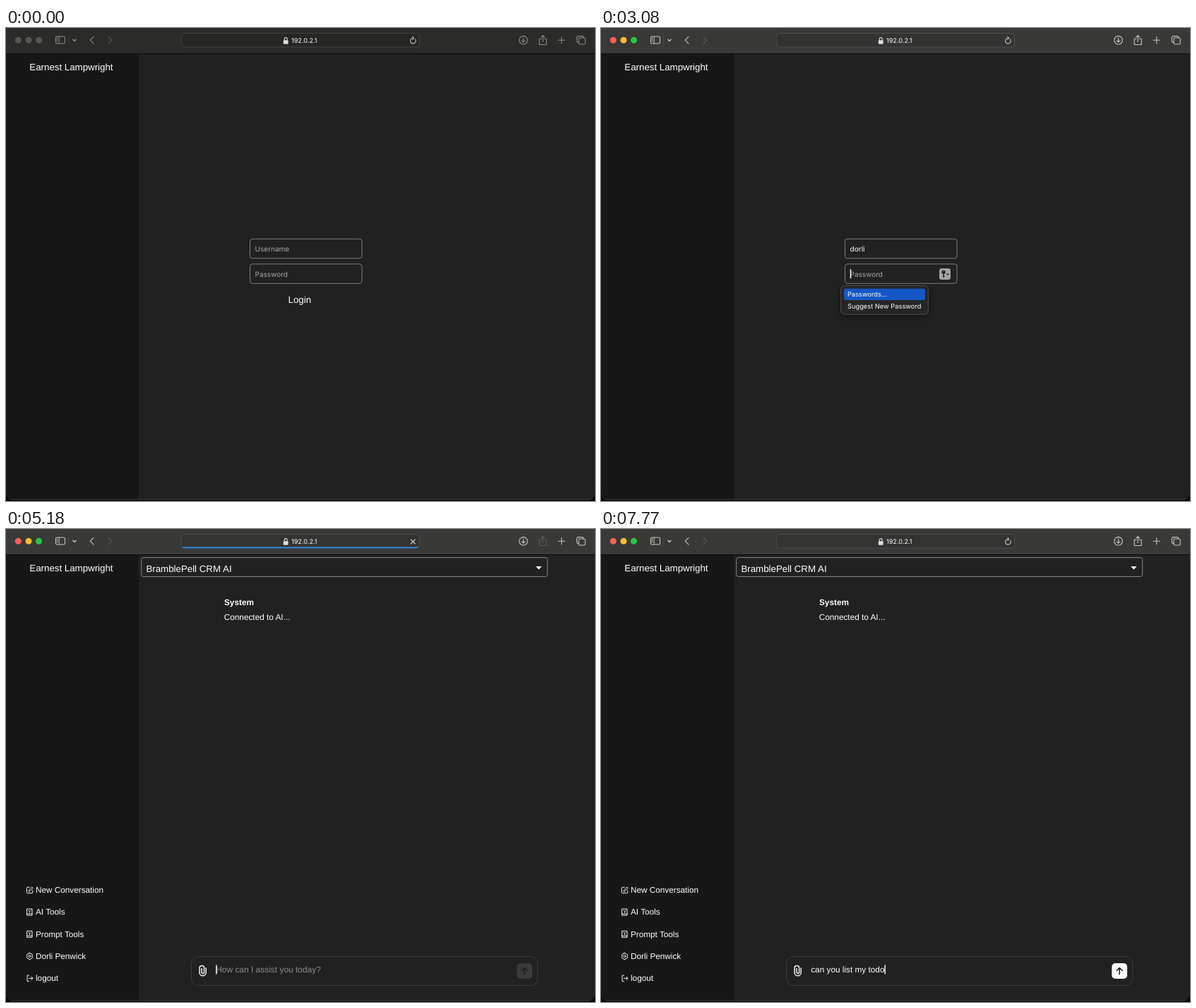
Write an HTML page that moves like this. It is 834 by 671 pixels and loops after 8 s.

```html
<!DOCTYPE html>
<html lang="en">
<head>
<meta charset="utf-8">
<title>Login and chat</title>
<style>
  html, body { margin: 0; width: 100%; height: 100%; overflow: hidden; background: #060606; }
  svg { display: block; width: 834px; height: 671px; --ink: #8b8b8a; --dim: #505050; }
  svg.active { --ink: #c6c6c5; --dim: #5c5c5b; }
  text { font-family: "Liberation Sans", Arial, sans-serif; font-size: 11.8px; fill: #fff;
         white-space: pre; text-rendering: geometricPrecision; }
  .ui { font-family: Inter, sans-serif; font-size: 10px; }
  .small { font-family: Inter, sans-serif; font-size: 9.3px; }
  .big { font-size: 13.3px; }
  .hint { fill: #a9a9a9; }
  .line { fill: none; stroke: var(--ink); stroke-width: 1.1; stroke-linecap: round; stroke-linejoin: round; }
  .item { fill: none; stroke: #f2f2f2; stroke-width: 1; stroke-linecap: round; stroke-linejoin: round; }
  .bar { fill: #2b2b2a; }
  .active .bar { fill: #393938; }
  .address { fill: #262625; stroke: #444443; }
  .active .address { fill: #333332; stroke: #4e4e4d; }
  .light { fill: #575756; }
  .active .red { fill: #ff5f57; }
  .active .amber { fill: #febc2e; }
  .active .green { fill: #28c840; }
  .field { fill: none; stroke: #7d7d7d; }
</style>
</head>
<body>
<svg id="stage" viewBox="0 0 834 671">
  <defs>
    <clipPath id="window"><rect y="-10" width="834" height="679.5" rx="9"/></clipPath>
    <clipPath id="addressClip"><rect x="248" y="7" width="337.5" height="20.5" rx="5"/></clipPath>
    <filter id="shadow" x="-20%" y="-30%" width="140%" height="180%">
      <feDropShadow dx="0" dy="3" stdDeviation="4" flood-color="#000" flood-opacity=".4"/>
    </filter>
  </defs>

  <g clip-path="url(#window)">
    <rect width="834" height="671" fill="#212121"/>
    <rect y="37" width="188" height="634" fill="#171717"/>
    <rect class="bar" width="834" height="36"/>
    <rect y="36" width="834" height="1" fill="#080808"/>
    <path d="M0 669H834" stroke="#484848"/>
  </g>

  <g id="toolbar">
    <circle class="light red" cx="17.3" cy="17.3" r="4.5"/>
    <circle class="light amber" cx="32" cy="17.3" r="4.5"/>
    <circle class="light green" cx="46.5" cy="17.3" r="4.5"/>
    <g class="line">
      <rect x="70.5" y="12" width="13" height="10" rx="1.8"/>
      <path d="M75.2 12V22M72.2 14.3h1.3M72.2 16.4h1.3M72.2 18.5h1.3" stroke-width=".9"/>
      <path d="M94.7 16.3l2.2 2.2 2.2-2.2" stroke-width="1.3"/>
      <path d="M124 12.3l-4.8 4.9 4.8 4.9"/>
    </g>
    <path d="M88.5 11V23" stroke="#484847" stroke-width=".8"/>
    <path class="line" d="M145 12.3l4.8 4.9-4.8 4.9" style="stroke:var(--dim)"/>
    <rect class="address" x="248.2" y="7.5" width="337.2" height="19.6" rx="5" stroke-width="1"/>
    <g clip-path="url(#addressClip)"><rect id="progress" x="248" y="25.4" width="0" height="2" fill="#3488e6"/></g>
    <rect x="392.8" y="17.2" width="6.8" height="5.6" rx="1" fill="#dededd"/>
    <path d="M394.2 17.5v-1.9a2 2 0 0 1 4 0v1.9" fill="none" stroke="#dededd" stroke-width="1.1"/>
    <text class="small" x="404" y="21.2" style="font-size:9.1px">192.0.2.1</text>
    <g id="reload" class="line" style="stroke:#c2c2c1">
      <path d="M579.6 16A3.9 3.9 0 1 1 576.3 14.3"/>
      <path d="M575.6 12.3l2.1 2-2.1 2"/>
    </g>
    <path id="stop" class="line" style="stroke:#d2d2d1" d="M573.2 14.8l6.2 6.2M579.4 14.8l-6.2 6.2"/>
    <g class="line">
      <circle cx="732.6" cy="17.2" r="5.8"/>
      <path d="M732.6 14v6M730.2 17.8l2.4 2.4 2.4-2.4"/>
      <path id="share" d="M758 15.3h-2.8v8.2h10v-8.2h-2.8M760.2 19.5V10.8M757.8 13l2.4-2.4 2.4 2.4"/>
      <path d="M782 17.2h9.4M786.7 12.5v9.4"/>
      <rect x="811" y="14" width="9.2" height="9" rx="1.8"/>
      <path d="M811 20.5h-1a1.7 1.7 0 0 1-1.7-1.7v-5.4a1.8 1.8 0 0 1 1.8-1.8h5.9a1.7 1.7 0 0 1 1.7 1.7v.7"/>
    </g>
  </g>

  <text class="big" x="33.3" y="60">Earnest Lampwright</text>

  <g id="login">
    <rect class="field" x="345.5" y="299.2" width="158.5" height="27.6" rx="3.5"/>
    <rect class="field" x="345.5" y="334.8" width="158.5" height="27.6" rx="3.5"/>
    <text id="user" class="ui" x="352.6" y="317"></text>
    <text id="passHint" class="ui hint" x="352.6" y="352.6">Password</text>
    <g id="dots" fill="#fff"></g>
    <text class="big" x="399.5" y="389.8">Login</text>
    <g id="key">
      <rect x="479" y="341" width="16" height="16" rx="3.6" fill="#a4a4a4"/>
      <circle cx="485" cy="346.3" r="2.7" fill="#222"/>
      <path d="M485 347.5v6.6M485 352.2h1.5" stroke="#222" stroke-width="1.5" fill="none"/>
      <circle cx="485" cy="345.3" r=".7" fill="#a4a4a4"/>
      <path d="M489.3 348.3l1.6 1.6 1.6-1.6" fill="none" stroke="#222" stroke-width="1.1"/>
    </g>
    <g id="menu">
      <rect x="339.7" y="365.3" width="123.6" height="41" rx="5.5" fill="#272727" stroke="#4d4d4d" filter="url(#shadow)"/>
      <rect x="344" y="369.8" width="115" height="16.2" rx="3" fill="#1557c5"/>
      <text class="small" x="349" y="381.4">Passwords...</text>
      <text class="small" x="349" y="397.5">Suggest New Password</text>
    </g>
  </g>

  <g id="chat">
    <rect x="191.7" y="40.5" width="575" height="27" rx="3" fill="none" stroke="#858585"/>
    <text class="big" x="198.4" y="60.5">BramblePell CRM AI</text>
    <path d="M750.2 53h8.4l-4.2 4.4z" fill="#fff"/>
    <text x="309" y="108.4" font-weight="700">System</text>
    <text x="308.7" y="129">Connected to AI...</text>
    <g id="items"></g>
    <rect x="262.5" y="606.5" width="490.3" height="41" rx="10" fill="#212121" stroke="#3c3c3c"/>
    <path class="item" style="stroke-width:1.5" d="M283.2 622.8v6.4a4.6 4.6 0 0 1-9.2 0v-6.4a3.3 3.3 0 0 1 6.6 0v5.9a1.8 1.8 0 0 1-3.6 0v-5.2"/>
    <text id="prompt" x="297.2" y="629"></text>
    <g id="send">
      <rect id="sendBox" x="723.3" y="616" width="21.8" height="22" rx="5"/>
      <path id="sendArrow" d="M734.2 631.7v-9M730.3 626.4l3.9-3.9 3.9 3.9" fill="none" stroke-width="1.5" stroke-linecap="round" stroke-linejoin="round"/>
    </g>
  </g>

  <rect id="caret" width="1.4" height="13" fill="#fff"/>
  <path id="arrow" d="M.7.8v10.4l2.4-2.2 1.6 3.7 1.8-.8-1.6-3.5h3.2z" fill="#111" stroke="#f4f4f4" stroke-width="1"/>
  <path id="beam" d="M-2.3-6.6Q0-6.6 0-5V5Q0 6.6-2.3 6.6M2.3-6.6Q0-6.6 0-5V5Q0 6.6 2.3 6.6" fill="none" stroke="#eee" stroke-width="1"/>
</svg>

<script>
const LOOP = 8000, TICK = 70;
const $ = id => document.getElementById(id);
const ids = ["stage", "progress", "reload", "stop", "share", "login", "user", "passHint", "dots", "key",
  "menu", "chat", "items", "prompt", "sendBox", "sendArrow", "caret", "arrow", "beam"];
const el = Object.fromEntries(ids.map(id => [id, $(id)]));

// Moments of the story, in ms
const at = { beam: 1260, focus: 1330, pass: 3080, fade: 3360, closed: 3430, load: 4830, page: 5110, done: 5390 };
const userKeys = [1890, 2100, 2310, 2590, 2730];
const passKeys = [3360, 3570, 3850, 3990, 4130, 4270, 4410];
const promptKeys = [5530, 5600, 5740, 5810, 6020, 6090, 6160, 6230, 6440, 6510,
  6650, 6720, 6860, 6930, 7140, 7280, 7420, 7560, 7630, 7770];
const progressSteps = [[4900, .1], [4970, .35], [5040, .6], [5110, .85], [5180, 1]];
const entry = [[210, 544], [280, 450], [350, 405]];
const userName = "dorli", promptText = "can you list my todo";

const icons = {
  edit: "M4.5 1H1.6A1 1 0 0 0 .6 2v6.4a1 1 0 0 0 1 1H8a1 1 0 0 0 1-1V5.6M3.4 6.8l.4-2L8 .6l1.5 1.5-4.2 4.2z",
  tool: "M1.2.5h7v9h-7zM1.2 7.4h7M3.2 2.5l1.5 1.6 1.5-1.6M4.7 4.1v1.6",
  gear: "M3.6.5h2.2l.6 1.3 1.5.1 1 1.8L8 5l.9 1.3-1 1.8-1.5.1-.6 1.3H3.6L3 8.2l-1.5-.1-1-1.8L1.4 5 .5 3.7l1-1.8L3 1.8zM6.2 5a1.5 1.5 0 1 1-3 0a1.5 1.5 0 1 1 3 0",
  exit: "M3.6.7H1.3v8.6h2.3M3.6 5h5.5M7 2.8L9.2 5 7 7.2"
};
const items = [["edit", "New Conversation"], ["tool", "AI Tools"], ["tool", "Prompt Tools"],
  ["gear", "Dorli Penwick"], ["exit", "logout"]];
el.items.innerHTML = items.map(([icon, label], i) => {
  const y = 512 + i * 31.3;
  return `<path class="item" transform="translate(28.8 ${y - 4.8})" d="${icons[icon]}"/>` +
    `<text x="42" y="${y + 4}" style="font-size:11.75px">${label}</text>`;
}).join("");
el.dots.innerHTML = passKeys.map((_, i) =>
  `<circle cx="${(355.9 + i * 6.3).toFixed(1)}" cy="349" r="2.4"/>`).join("");

const count = (times, t) => times.filter(k => k <= t).length;
const show = (node, on) => { node.style.display = on ? "" : "none"; };
const move = (node, x, y) => node.setAttribute("transform", `translate(${x.toFixed(2)} ${y.toFixed(2)})`);
const ease = p => p * p * (3 - 2 * p);

function typed(node, text, hint, size) {
  node.textContent = text || hint;
  node.style.fill = text ? "#fff" : hint === "Username" ? "#a9a9a9" : "#8d8d8d";
  if (size) node.style.fontSize = text ? "11.8px" : size;
  return text ? node.getComputedTextLength() : 0;
}

function drawPointer(t) {
  show(el.arrow, t >= entry[0][0] && t < at.beam);
  show(el.beam, t >= at.beam && t < userKeys[0]);
  move(el.beam, 391.5, 321);
  const n = count(entry.map(e => e[0]), t);
  if (!n) return;
  const p = ease(Math.min(1, Math.max(0, (t - 560) / 630)));
  move(el.arrow, 416 - 26 * p, entry[n - 1][1] - 85 * p);
}

function draw(time) {
  const t = Math.floor(time / TICK) * TICK;
  const loading = t >= at.load && t < at.done;
  const onChat = t >= at.page;

  el.stage.classList.toggle("active", t >= at.focus);
  show(el.reload, !loading);
  show(el.stop, loading);
  el.share.style.stroke = loading ? "var(--dim)" : "";
  const filled = count(progressSteps.map(s => s[0]), t);
  el.progress.setAttribute("width", loading && filled ? 338 * progressSteps[filled - 1][1] : 0);
  el.progress.style.opacity = t >= 5250 ? .5 : 1;

  show(el.login, !onChat);
  show(el.chat, onChat);
  show(el.caret, t >= at.focus);

  let x, y;
  if (onChat) {
    const text = promptText.slice(0, count(promptKeys, t));
    x = 297.2 + typed(el.prompt, text, "How can I assist you today?", "11.95px");
    y = 618.5;
    el.sendBox.style.fill = text ? "#fff" : "#3a3a3a";
    el.sendArrow.style.stroke = text ? "#1c1c1c" : "#1f1f1f";
  } else {
    const onPass = t >= at.pass;
    const width = typed(el.user, userName.slice(0, count(userKeys, t)), "Username");
    const dots = count(passKeys, t);
    [...el.dots.children].forEach((dot, i) => show(dot, i < dots));
    show(el.passHint, !dots);
    show(el.key, t >= at.focus);
    move(el.key, 0, onPass ? 0 : -35.6);
    show(el.menu, onPass && t < at.closed);
    el.menu.style.opacity = t >= at.fade ? .5 : 1;
    x = onPass ? 352.8 + dots * 6.3 : 352.8 + width;
    y = onPass ? 342.2 : 306.6;
  }
  move(el.caret, x, y);
  drawPointer(t);
}

function frame(now) {
  draw(now % LOOP);
  requestAnimationFrame(frame);
}
draw(0);
requestAnimationFrame(frame);
</script>
</body>
</html>
```
